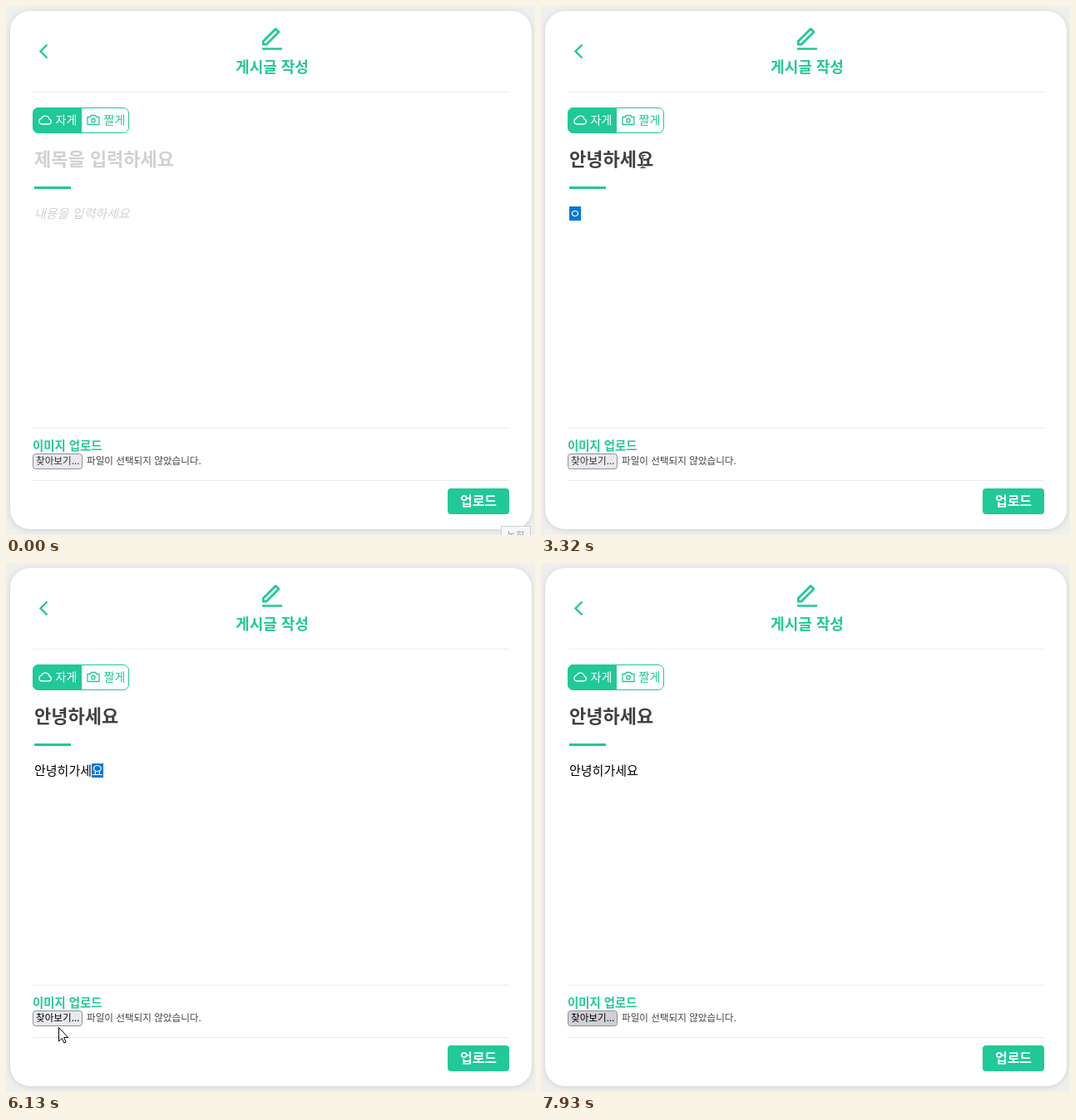
Animation, 636 px wide and 636 px high, one loop 8000 ms. Source, as an HTML page:

```html
<!DOCTYPE html>
<html lang="ko">
<head>
<meta charset="utf-8">
<style>
  html, body { margin: 0; width: 100%; height: 100%; overflow: hidden; background: #efefee; }
  svg { display: block; width: 636px; height: 636px; font-family: "Noto Sans CJK KR", "Noto Sans CJK", "Noto Sans KR", sans-serif; }
  text { white-space: pre; }
  .bold { font-weight: 700; }
  .green { fill: #20c997; }
  .line { fill: none; stroke: #20c997; }
  .card { fill: #fff; filter: drop-shadow(0 1px 3px rgba(0, 0, 0, .13)); }
  .title { font-size: 22px; font-weight: 700; }
  .body { font-size: 15px; }
  .hint { fill: #d0d0d0; }
  .file { font-size: 11.6px; }
  #beam { fill: none; stroke: #fff; mix-blend-mode: difference; }
</style>
</head>
<body>
<svg viewBox="0 0 636 636">
  <rect width="636" height="636" fill="#efefee"/>
  <rect class="card" x="5" y="6" width="627" height="623" rx="24"/>
  <path d="M32 103.5H605M32 507.5H605M32 570.5H605" stroke="#ececec"/>

  <path class="line" d="M49.5 46.5l-8 8 8 8" stroke-width="2.4"/>
  <path class="green" transform="translate(304 23.5) scale(1.333)" d="M6.4 16L16.56 5.86l-1.42-1.42L5 14.59V16zM7.24 18H3v-4.24L14.43 2.32a1 1 0 0 1 1.42 0l2.83 2.83a1 1 0 0 1 0 1.41zM3 20h18v2H3z" fill-rule="evenodd"/>
  <text class="green bold" x="320" y="80" font-size="18" text-anchor="middle">게시글 작성</text>

  <rect class="line" x="32.5" y="122.5" width="115" height="30" rx="6.5"/>
  <path class="green" d="M91 122H39a7 7 0 0 0-7 7v17a7 7 0 0 0 7 7h52z"/>
  <path class="line" style="stroke:#fff" stroke-width="1.3" d="M43 142h8.5a3 3 0 0 0 .6-5.9a5 5 0 0 0-9.5-1a3.5 3.5 0 0 0 .4 6.9z"/>
  <g class="line" stroke-width="1.3" stroke-linejoin="round">
    <path d="M98 133.5h3l1.5-2h5l1.5 2h3v9H98z"/>
    <circle cx="105" cy="137.7" r="2.2"/>
  </g>
  <text x="59.5" y="142" font-size="14" fill="#fff">자게</text>
  <text class="green" x="117.5" y="142" font-size="14">짤게</text>

  <g id="title"></g>
  <rect class="green" x="34" y="217" width="44" height="3"/>
  <g id="body"></g>

  <text class="green bold" x="32" y="533.5" font-size="14.4">이미지 업로드</text>
  <rect id="browse" x="32.5" y="538.5" width="59" height="18" rx="3" stroke="#8f8f9d"/>
  <text id="browseText" class="file" x="36" y="551" font-weight="500">찾아보기...</text>
  <text class="file" x="97" y="551" fill="#404040">파일이 선택되지 않았습니다.</text>
  <rect class="green" x="531" y="580" width="74" height="31" rx="4"/>
  <text class="bold" x="568" y="600.5" font-size="16" fill="#fff" text-anchor="middle">업로드</text>

  <g id="tip">
    <rect x="595.5" y="625.5" width="35" height="20" fill="#f6f6f6" stroke="#cfcfcf"/>
    <text x="613" y="642" font-size="12" fill="#999" text-anchor="middle">녹화</text>
  </g>
  <path id="beam" d="M-3-7.5h2.5l.5.5.5-.5H3M0-7V7M-3 7.5h2.5L0 7l.5.5H3"/>
  <path id="arrow" d="M.5.5V17l3.8-3.6 2.6 5.6 2.3-1-2.6-5.5h5.2z" fill="#fff" stroke="#000"/>
</svg>
<script>
const LOOP = 8000;
const $ = id => document.getElementById(id);

// Each field: typed states by time; the last syllable is highlighted while composing.
const fields = [
  { node: $('title'), cls: 'title', size: 22, baseline: 192, top: 172, height: 25, color: '#404040',
    hint: '제목을 입력하세요', focus: 850, done: 3070,
    keys: [[1370, 'ㅇ'], [1450, '아'], [1590, '안'], [1750, '안ㄴ'], [1850, '안녀'], [1950, '안녕'],
      [2160, '안녕ㅎ'], [2220, '안녕하'], [2580, '안녕하ㅅ'], [2670, '안녕하세'],
      [2790, '안녕하세ㅇ'], [2870, '안녕하세요']] },
  { node: $('body'), cls: 'body', size: 15, baseline: 254.5, top: 241, height: 17, color: '#000',
    hint: '내용을 입력하세요', focus: 3070, done: 6450,
    keys: [[3320, 'ㅇ'], [3430, '아'], [3510, '안'], [3670, '안ㄴ'], [3770, '안녀'], [3860, '안녕'],
      [4010, '안녕ㅎ'], [4090, '안녕히'], [4250, '안녕히ㄱ'], [4340, '안녕히가'], [4490, '안녕히가ㅅ'],
      [4570, '안녕히가세'], [4700, '안녕히가세ㅇ'], [4780, '안녕히가세요']] }
];

// Pointer path: time, x, y
const path = [
  [20, 600, 640], [260, 330, 250], [400, 122, 136], [500, 129, 190], [700, 129, 190], [900, 122.5, 187],
  [5359, 122.5, 187], [5360, 131.5, 187], [5570, 131.5, 187], [5700, 120, 260], [5900, 84, 480],
  [6000, 68, 548], [6130, 63, 558], [6180, 63, 558], [6310, 57, 546], [6740, 57, 546], [6900, 65, 539],
  [7110, 48, 550], [7140, 48, 550], [7300, 31, 545], [7520, 42, 550], [7850, 42, 550], [7930, 10, 550]
];

function pointerAt(t) {
  const i = path.findIndex(p => p[0] > t);
  if (i < 1) return path[i < 0 ? path.length - 1 : 0].slice(1);
  const [a, b] = [path[i - 1], path[i]];
  const k = (t - a[0]) / (b[0] - a[0]);
  return [a[1] + (b[1] - a[1]) * k, a[2] + (b[2] - a[2]) * k];
}

function fieldMarkup(f, t) {
  const text = (x, s, attrs) => `<text class="${f.cls}" x="${x}" y="${f.baseline}" ${attrs}>${s}</text>`;
  const box = (x, w, fill) => `<rect x="${x}" y="${f.top}" width="${w}" height="${f.height}" fill="${fill}"/>`;
  const key = f.keys.filter(k => k[0] <= t).pop();
  if (!key) {
    const slant = f.cls === 'body' ? 'font-style="italic"' : '';
    return text(34, f.hint, `fill="#d0d0d0" ${slant}`) + (t >= f.focus ? box(34, 1, '#000') : '');
  }
  const word = key[1], fill = `fill="${f.color}"`;
  if (t >= f.done) return text(34, word, fill);
  const advance = f.size * .92, x = 34 + advance * (word.length - 1);
  return text(34, word.slice(0, -1), fill) + box(Math.round(x), Math.round(advance), '#0078d7') +
    text(x, word.slice(-1), 'fill="#fff"');
}

function draw(t) {
  for (const f of fields) {
    const markup = fieldMarkup(f, t);
    if (f.markup !== markup) f.node.innerHTML = f.markup = markup;
  }

  const [x, y] = pointerAt(t);
  const visible = t >= 20 && t < 7930;
  const overText = (y > 168 && y < 200) || (y > 238 && y < 500);
  for (const [id, on] of [['beam', overText], ['arrow', !overText]]) {
    $(id).style.display = visible && on ? '' : 'none';
    $(id).setAttribute('transform', `translate(${Math.floor(x) + (id === 'beam' ? .5 : 0)} ${Math.round(y)})`);
  }

  const hover = t > 6310 || (t > 5900 && x > 32 && x < 92 && y > 538 && y < 557);
  const pressed = t >= 6450 && t < 6560;
  $('browse').setAttribute('fill', pressed ? '#b1b1b9' : hover ? '#d0d0d7' : '#e9e9ed');
  $('browseText').setAttribute('fill', t > 5900 ? '#000' : '#333');
  $('tip').style.opacity = Math.max(0, 1 - Math.max(0, t - 20) / 130);
}

const start = performance.now();
(function tick() {
  draw((performance.now() - start) % LOOP);
  requestAnimationFrame(tick);
})();
</script>
</body>
</html>
```
